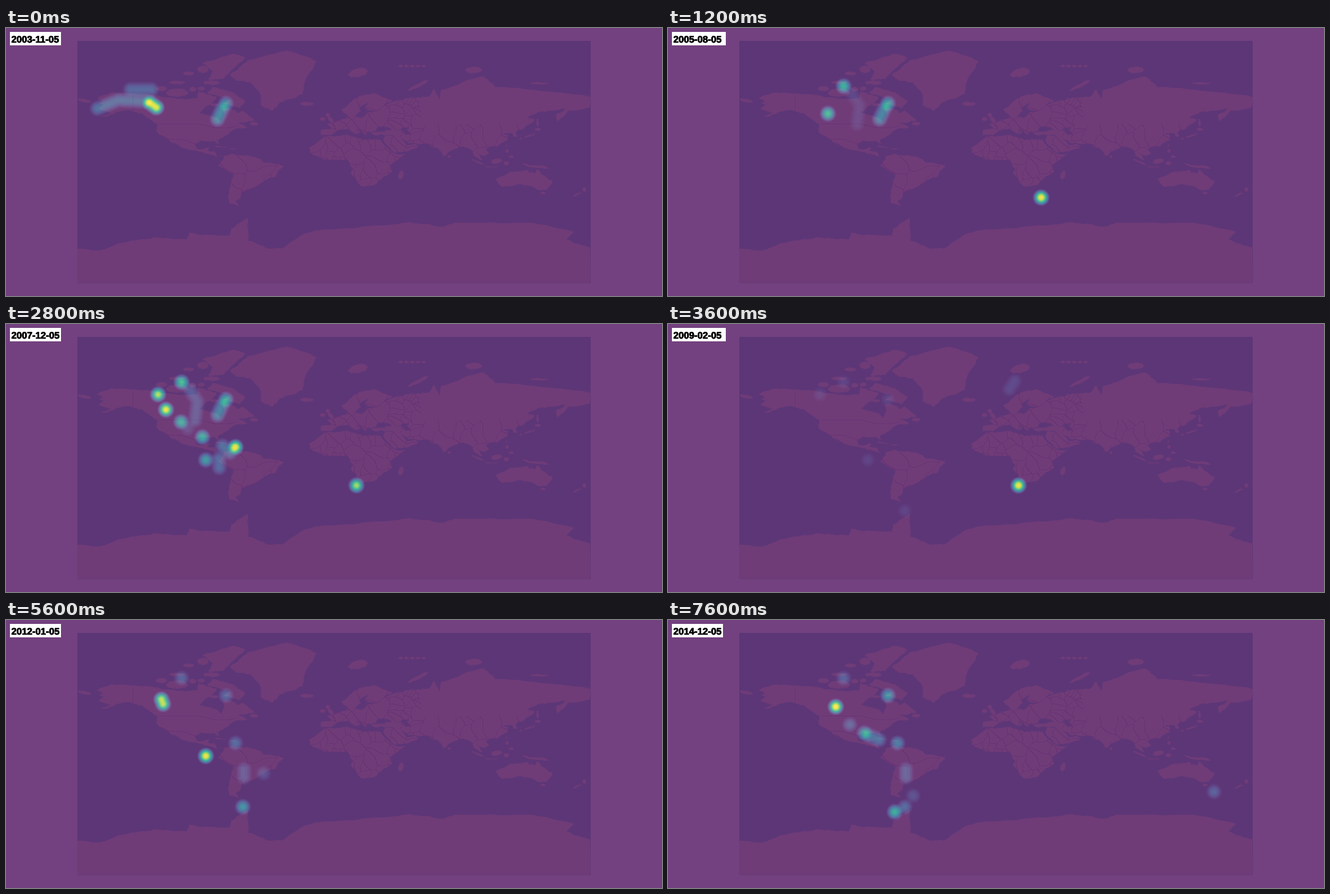
A matplotlib script that plays this animation: 1169x479 px, repeating every 8 s.

```python
import numpy as np
import matplotlib.pyplot as plt
from matplotlib.animation import FuncAnimation
from matplotlib.colors import to_rgba
from matplotlib.patches import Polygon, Rectangle
from matplotlib.patheffects import withStroke

W, H, DPI = 1169, 479, 64
FRAMES, INTERVAL = 20, 400
MAP_X, MAP_Y, MAP_W, MAP_H = 127, 23, 914.5, 432.5
WATER, LAND, BORDER = "#aad3df", "#f0ebe4", "#cfb6c8"
RADIUS = 16.5

rng = np.random.default_rng(3)
fig = plt.figure(figsize=(W / DPI, H / DPI), dpi=DPI, facecolor="white")
ax = fig.add_axes([0, 0, 1, 1])
ax.set_xlim(0, W)
ax.set_ylim(H, 0)
ax.axis("off")
yy, xx = np.mgrid[0:H, 0:W] + 0.5


def project(lonlat):
    """Mercator, squeezed vertically into the map rectangle."""
    lon, lat = np.array(lonlat, float).reshape(-1, 2).T
    x = MAP_X + (lon + 180) / 360 * MAP_W
    y = MAP_Y + MAP_H / 2 * (1 - np.arcsinh(np.tan(np.radians(lat))) / np.pi)
    return np.column_stack([x, y])


def roughen(points, levels=3, amount=0.11):
    """Midpoint displacement: a jagged coast from a few key points."""
    for _ in range(levels):
        step = np.roll(points, -1, axis=0) - points
        size = np.hypot(*step.T)[:, None] + 1e-9
        reach = rng.uniform(-amount, amount, size.shape) * np.minimum(size, 12)
        mid = points + step / 2 + step[:, ::-1] * [1, -1] / size * reach
        points = np.stack([points, mid], axis=1).reshape(-1, 2)
    return points


def area(points, color=LAND):
    return ax.add_patch(Polygon(points, fc=color, ec="none", zorder=2))


def land(*lonlat, countries=0):
    points = roughen(project(lonlat))
    patch = area(points)
    if countries:
        draw_countries(points, patch, countries)


def draw_countries(points, patch, count):
    """Border lines between the cells around random capitals."""
    capitals = rng.uniform(points.min(0), points.max(0), (count, 2))
    wx, wy = xx + 2 * np.sin(yy / 5), yy + 2 * np.sin(xx / 6)
    cell = np.argmin([(wx - x) ** 2 + (wy - y) ** 2 for x, y in capitals], axis=0)
    edge = (cell != np.roll(cell, 1, 0)) | (cell != np.roll(cell, 1, 1))
    lines = np.zeros((H, W, 4))
    lines[edge] = to_rgba(BORDER, 0.7)
    ax.imshow(lines, extent=(0, W, H, 0), aspect="auto", zorder=3).set_clip_path(patch)


def island(lon, lat, rx, ry, tilt=0):
    a = np.linspace(0, 2 * np.pi, 9)[:-1]
    land(*np.column_stack([lon + rx * np.cos(a), lat + ry * np.sin(a) + tilt * np.cos(a)]).ravel())


ax.add_patch(Rectangle((MAP_X, MAP_Y), MAP_W, MAP_H, fc=WATER, ec="none", zorder=1))

# Alaska and Canada, then the United States down to Panama
land(-168, 65.7, -162, 66.3, -166, 68.3, -156, 71.3, -128, 70.2, -108, 68, -96, 68, -95, 71.8,
     -82, 69, -87, 64.5, -94.5, 59, -82, 55, -79.3, 51.3, -76.7, 57, -78, 62.4, -70, 61,
     -67.5, 58.3, -64.3, 60.4, -55.8, 52.2, -66, 50.2, -70, 47, -122.8, 48.5, -134, 58,
     -146, 60.8, -154, 58.2, -164, 54.6, -157, 58.7, -165, 61.5, -161, 64.4)
land(-124, 49.3, -95, 51, -70, 50, -65, 49, -61, 45.5, -70, 43.5, -76, 36, -81.3, 31, -80.5, 25.2,
     -84, 30, -94, 29.6, -97.5, 26, -96, 19, -91, 18.8, -87, 21.4, -88.6, 15.8, -83.3, 15,
     -82, 9, -77.3, 8.6, -83, 8.3, -92, 14.5, -105.6, 20, -114, 31, -110, 23, -117.2, 32.8,
     -124.3, 40.3)
# Baffin, Ellesmere, Greenland
land(-89, 71, -73, 68.3, -77.5, 65, -66, 62, -62, 66.5, -72, 71.5, -85, 73.7)
land(-62, 82.4, -70, 83.1, -92, 81.2, -85, 79, -88, 76.6, -78, 76.7, -70, 80)
land(-73, 78.2, -60, 81.9, -32, 83.6, -12, 81.6, -20, 76.5, -22, 70.5, -38, 65.8, -43.5, 60,
     -51, 64, -51, 69.7, -58.5, 75.5, -68, 76.1)
# South America, Africa
land(-77.3, 8.6, -72, 12, -61, 10, -51.5, 4.3, -50, 0, -35.2, -6, -39, -13, -41, -22, -48.5, -26,
     -57, -36.5, -65, -41, -65.8, -47.8, -69, -51, -66, -55, -73.5, -52.5, -73.5, -38, -70.3, -19,
     -81, -5, -77.5, 4, countries=9)
land(-6, 35.8, 10, 37.3, 20, 31, 33, 31, 37.3, 20.5, 43, 11.8, 51, 12, 39.5, -4.5, 40.7, -14.8,
     35, -21, 28.5, -32.8, 20, -34.8, 12, -17, 13.7, -10.7, 9, 4, -8, 4.4, -17, 14, -17, 21,
     -9.8, 30, countries=45)
# Europe: the south up to the Baltic, then Scandinavia
land(-9, 43, -9, 37, -2, 36.8, 4, 43.4, 10, 43.8, 16, 38, 18.4, 40.2, 13, 45.5, 19.3, 42, 23, 36.5,
     23, 40.5, 29, 41.2, 31, 46.3, 38, 46, 41.5, 41.5, 62, 50, 60, 69, 44, 67, 35, 64.5, 30, 69,
     28, 60, 23.5, 59, 19.5, 54.4, 10.5, 57.5, 8.7, 54, -4.7, 48.5, -1.3, 44, countries=40)
land(41, 66.6, 28, 71, 14.5, 68, 5, 61.5, 8, 58, 14.3, 55.5, 19, 60, 17.5, 62, 24, 65.8, 21.4, 62,
     30, 60, 35, 64.3, countries=4)
# Russia, the rest of Asia, Arabia, Turkey
land(42, 50, 50, 68.3, 66, 69, 70, 73, 74, 68, 75, 72.5, 104, 77.6, 113, 73.7, 140, 72.5, 180, 69,
     179, 62.3, 164, 59.9, 156.7, 51, 155.7, 57, 163, 61.5, 143, 59.3, 135.5, 54.8, 141, 53,
     132, 43, 100, 42, 55, 44)
land(55, 48, 135, 48, 127.5, 39.7, 129, 35.3, 126.5, 35, 125, 39.7, 118, 39, 122, 37, 121.8, 31,
     114, 22.3, 106, 19, 109, 13, 105, 8.7, 100.5, 13.5, 104, 1.4, 98, 9, 97, 16.5, 91, 22,
     80.2, 15, 77.5, 8, 72.8, 20, 67, 25, 51, 28, 44, 36, 48, 42, countries=28)
land(34.9, 29.5, 43, 13, 52, 16, 59.8, 22.5, 56.3, 26, 51, 24.5, 48.5, 30, 48, 37, 36, 37, countries=7)
land(26.2, 40, 28, 37, 48, 36, 48, 42, 36, 41.6)
# Australia, New Guinea
land(142.5, -10.8, 146.3, -19, 153.4, -27, 150, -37.3, 146, -39, 138, -34, 131, -31.5, 118, -35,
     113.5, -25, 125, -14.5, 136.8, -12, 136.5, -16, 141, -17)
land(131, -0.8, 135, -3, 147.8, -6.2, 150.7, -10.5, 143, -9, 138, -8, 133, -4)

# Islands as rough ovals: Canadian Arctic, Atlantic and Europe, Russian Arctic, Asia, Oceania
for spec in [(-110, 71, 8, 2), (-121, 73, 4, 1.1), (-86, 75.4, 6, 0.9), (-99, 72.7, 2.5, 1.1),
             (-93, 73, 2.5, 0.9), (-110, 75.5, 6, 0.6), (-92, 79.6, 4, 1), (-102, 78.5, 4, 0.6),
             (-84, 64.5, 3, 1), (-56, 49.2, 3, 2)]:
    island(*spec)
for spec in [(-79.5, 21.7, 5, 0.6, -1.2), (-71, 19, 2.7, 0.8), (-19, 65, 5, 1.3), (-2.2, 53, 2, 2.4, -1.2),
             (-4.2, 57, 1.6, 1.7), (-8, 53.5, 2, 1.7), (17, 78.6, 7, 1.3, 0.6)]:
    island(*spec)
for spec in [(59, 74.2, 8, 0.7, 2.2), (98, 79.5, 6, 0.9), (144, 75.2, 7, 0.4), (-175, 67, 5, 1, -0.8),
             (142.8, 50.3, 0.8, 4), (143, 43.4, 2.3, 1.5), (137, 36, 4.5, 1, 2.2), (131, 32.5, 1, 1.2)]:
    island(*spec)
for spec in [(121, 23.6, 0.6, 1.4), (80.8, 7.8, 1, 1.8), (101, -0.5, 5, 1.3, -4.5), (110, -7.4, 5, 0.6, -0.6),
             (114, 1, 4, 4, 1.5), (121, -2, 2, 3), (121.5, 16, 1.2, 2.6), (124.5, 7.7, 1.8, 1.8),
             (47, -19, 2, 6, 2), (146.7, -42, 1.8, 1.4), (175.8, -38, 1.4, 2.6), (170.3, -43.6, 3, 1, 2)]:
    island(*spec)
for lon in range(47, 66, 4):
    island(lon, 80.5, 1.6, 0.3)
area(roughen(project([47, 45, 53, 46, 51, 43, 54, 37, 50, 37.5])), WATER)

# Antarctica, in stage pixels
ice = np.array([(127, 395), (170, 397), (200, 385), (265, 374), (322, 378), (326, 366), (385, 371),
                (399, 371), (401, 359), (430, 339), (431, 380), (465, 394), (492, 394), (530, 368),
                (560, 361), (625, 357), (720, 347), (775, 355), (800, 348), (930, 348), (1012, 364),
                (999, 378), (1041, 392)], float)
area(np.vstack([roughen(ice)[:-7], [[1041.5, 455.5], [127, 455.5]]]))

for line in [(-141, 60.2, -141, 69.6), (-122.8, 49, -95, 49, -83, 45, -75, 45, -67.5, 47),
             (-117, 32.5, -106.5, 31.7, -97.3, 26)]:
    ax.plot(*project(line).T, color=BORDER, lw=0.8, zorder=3)

# Places and routes where the animals gather, in stage pixels
ROUTES = dict(
    aleutians=[(163, 144), (200, 129), (246, 131)], beaufort=[(222, 110), (259, 110)],
    yukon=[(257, 134), (268, 142)], mackenzie=[(271, 126)], coast=[(277, 142), (280, 150)],
    arctic=[(313, 104)], hudson=[(392, 135)], james=[(385, 146), (377, 163)],
    rockies=[(285, 153)], prairie=[(299, 155)], plains=[(328, 118), (341, 138), (337, 172)],
    desert=[(312, 175)], texas=[(324, 187)], gulf=[(350, 202)], mexico=[(357, 206), (376, 214)],
    panama=[(386, 218), (399, 230)], caribbean=[(409, 220)], galapagos=[(356, 243)],
    peru=[(379, 241), (380, 257)], andes=[(424, 267), (424, 281)], brazil=[(459, 274)],
    drake=[(422, 334)], palmer=[(404, 343)], falklands=[(437, 314)], cape=[(624.5, 288.5)],
    agulhas=[(665, 303)], norway=[(608, 117), (618, 102)], tasman=[(973, 307)])

# Strength of each route at key frames; between them it blends
KEYS = {
    0: dict(aleutians=.24, beaufort=.2, yukon=.9, hudson=.36, james=.36),
    3: dict(arctic=.56, rockies=.6, hudson=.46, james=.34, plains=.07, agulhas=1),
    7: dict(mackenzie=.85, arctic=.66, rockies=.97, desert=.55, gulf=.55, caribbean=1, panama=.25,
            hudson=.5, james=.34, plains=.16, texas=.1, galapagos=.46, peru=.22, cape=.85),
    9: dict(cape=1, mackenzie=.06, arctic=.06, hudson=.06, galapagos=.06, drake=.06, norway=.08),
    14: dict(coast=.85, galapagos=1, arctic=.18, hudson=.2, caribbean=.22, andes=.15, brazil=.12,
             drake=.42),
    17: dict(prairie=.78, arctic=.13, plains=.17, texas=.2, gulf=.6, mexico=.72, panama=.36,
             caribbean=.33, drake=.57, hudson=.34, james=.24, andes=.1),
    19: dict(prairie=1, hudson=.42, arctic=.18, texas=.2, gulf=.4, mexico=.26, caribbean=.31,
             andes=.18, palmer=.55, drake=.22, falklands=.12, tasman=.18)}


def route_field(points):
    """Quartic kernel swept along a route."""
    points = np.array(points, float)
    t = np.linspace(0, len(points) - 1, 12 * len(points) - 11)
    px, py = (np.interp(t, range(len(points)), c) for c in points.T)
    r2 = np.min([(xx - x) ** 2 + (yy - y) ** 2 for x, y in zip(px, py)], axis=0)
    return np.clip(1 - r2 / RADIUS ** 2, 0, None) ** 2


FIELDS = {name: route_field(points) for name, points in ROUTES.items()}


def heat(frame):
    keys = sorted(KEYS)
    total = sum(np.interp(frame, keys, [KEYS[k].get(name, 0) for k in keys]) * field
                for name, field in FIELDS.items())
    return 1.05 * total / total.max()


overlay = ax.imshow(heat(0), extent=(0, W, H, 0), cmap="viridis", vmin=0, vmax=1, alpha=0.75,
                    aspect="auto", interpolation="nearest", zorder=5)
label_box = ax.add_patch(Rectangle((6.5, 6.5), 92, 24, fc="white", ec="none", zorder=6))
label = ax.text(9.5, 26, "", family="Liberation Sans", weight="bold", size=16.8 * 72 / DPI,
                color="black", va="baseline", zorder=7,
                path_effects=[withStroke(linewidth=0.9, foreground="black")])


def update(frame):
    month = 10 + 7 * frame
    date = f"{2003 + month // 12}-{month % 12 + 1:02d}-05"
    narrow = date.count("1") + date.count("7")
    label.set_text(date)
    label_box.set_width(96 - 2.4 * narrow)
    overlay.set_data(heat(frame))
    return overlay, label_box, label


anim = FuncAnimation(fig, update, frames=FRAMES, interval=INTERVAL, repeat=True, repeat_delay=0)
plt.show()
```
